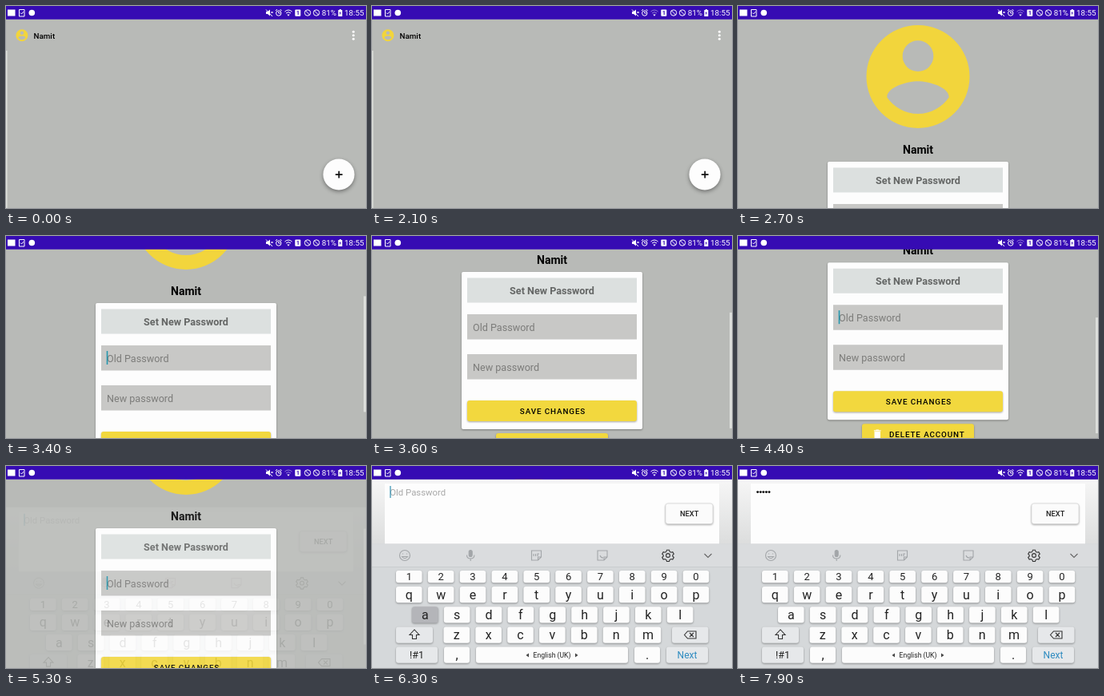
An HTML page that plays this animation: 450 px wide and 253 px high, repeating every 8 s.

```html
<!DOCTYPE html>
<html lang="en">
<head>
<meta charset="utf-8">
<title>Change password</title>
<style>
  html, body { margin: 0; height: 100%; overflow: hidden; background: #b8bab7; }
  svg { display: block; width: 100vw; height: 100vh; font-family: Roboto, sans-serif; }
  .mid { text-anchor: middle; }
  .medium { font-weight: 500; }
  .bold { font-weight: 700; }
  .line { fill: none; stroke: #fff; stroke-width: 1; }
  .tool { fill: none; stroke: #a3a6a9; stroke-width: 1.1; }
  .hint { font-size: 12.6px; fill: #7c7c7a; }
  .caps { font-size: 9.84px; font-weight: 500; letter-spacing: .09em; }
  .raised { filter: drop-shadow(0 1px 1px rgba(0,0,0,.35)); }
  .fab { filter: drop-shadow(0 2px 2.5px rgba(0,0,0,.4)); }
</style>
</head>
<body>
<svg viewBox="0 0 450 253" preserveAspectRatio="none">
  <defs>
    <path id="account" fill-rule="evenodd" d="M12 2a10 10 0 1 0 0 20a10 10 0 1 0 0-20zM12 5a3 3 0 0 1 0 6a3 3 0 0 1 0-6zm0 14.2c-2.5 0-4.71-1.28-6-3.22.03-1.99 4-3.08 6-3.08s5.97 1.09 6 3.08c-1.29 1.94-3.5 3.22-6 3.22z"/>
    <linearGradient id="margin" x2="0" y2="1">
      <stop stop-color="#f6f6f6"/><stop offset="1" stop-color="#dcdddd"/>
    </linearGradient>
  </defs>

  <g id="home">
    <path fill="#b8bab7" d="M0 0h450v253H0z"/>
    <path fill="#dfe2dd" d="M0 56h1.5v197H0z"/>
    <use href="#account" fill="#f2d53c" transform="translate(10.9 27.8) scale(.75)"/>
    <text class="medium" x="34.5" y="40.5" font-size="9.84">Namit</text>
    <g fill="#fff"><circle cx="434.3" cy="32.3" r="1.5"/><circle cx="434.3" cy="36.8" r="1.5"/><circle cx="434.3" cy="41.2" r="1.5"/></g>
    <circle class="fab" cx="416" cy="211" r="19.6" fill="#fdfdfd"/>
    <path d="M411.8 211.2h8.8M416.2 206.8v8.8" stroke="#111" stroke-width="1.7"/>
  </g>

  <g id="profile">
    <path fill="#b8bab7" d="M0 0h450v290H0z"/>
    <g id="page">
      <use href="#account" fill="#f2d53c" transform="translate(147.6 -183.9) scale(6.45)"/>
      <text class="mid bold" x="225" y="-10" font-size="14">Namit</text>
      <rect class="raised" x="112" width="226" height="197" rx="2" fill="#fdfdfd"/>
      <path fill="#dce0df" d="M119 7.500h212v31H119z"/>
      <text class="mid bold" x="225" y="28" font-size="12.6" fill="#646665">Set New Password</text>
      <path fill="#c8c8c6" d="M119 53h212v31.500H119zM119 103h212v31.500H119z"/>
      <text class="hint" x="126" y="73.700">Old Password</text>
      <text class="hint" x="126" y="123.500">New password</text>
      <path id="fieldCursor" fill="#2497ad" d="M125.700 60h1.600v17h-1.600z"/>
      <g class="raised" fill="#f2d83e">
        <rect x="119" y="161" width="212" height="26" rx="3"/>
        <rect x="155" y="202" width="140" height="25" rx="3"/>
      </g>
      <text class="mid caps" x="226" y="177.500">SAVE CHANGES</text>
      <text class="caps" x="189" y="218.700">DELETE ACCOUNT</text>
      <path fill="#fff" transform="translate(166.800 207.500) scale(.62)" d="M6 19c0 1.100.9 2 2 2h8c1.100 0 2-.9 2-2V7H6zM19 4h-3.500l-1-1h-5l-1 1H5v2h14z"/>
    </g>
    <rect id="thumb" x="447" width="3" height="145" fill="#dcdedb"/>
    <circle id="glow" cx="290" r="1372" fill="#623cf0"/>
  </g>

  <g id="ime">
    <path fill="url(#margin)" d="M0 17h450v81H0z"/>
    <path fill="#fdfdfd" d="M16 22h418v76H16z"/>
    <text id="hint" x="22.300" y="37" font-size="11.350" fill="#a8a8a8">Old Password</text>
    <g id="dots"></g>
    <path id="cursor" fill="#2f8fb0" d="M22.400 25h1.200v15h-1.200z"/>
    <rect class="raised" x="367" y="47" width="59" height="25.500" rx="3" fill="#fbfbfb" stroke="#d2d2d2" stroke-width=".6"/>
    <text class="mid medium" x="396.700" y="63.300" font-size="9.300" fill="#222">NEXT</text>
    <path fill="#d5d8da" d="M0 97.500h450V300H0z"/>
    <path fill="#dadcde" d="M0 97.500h450v28.500H0z"/>
    <path fill="#c6c9cb" d="M0 126h450v.8H0z"/>
    <g class="tool">
      <circle cx="41" cy="112" r="6.500"/><path d="M37.500 113.500q3.500 4.500 7 0zM38.500 109.500v1M43.500 109.500v1"/>
      <rect x="121.200" y="105.500" width="4" height="8" rx="2" fill="#a3a6a9"/><path d="M118.500 111.500q0 4.500 4.700 4.500t4.700-4.500M123.200 116v3"/>
      <path d="M199.500 106h12v8l-4 4h-8zM211.500 114h-4v4M202 110v3M204.500 110v3M207 113v-3h2"/>
      <path d="M282 106h12v8l-4 4h-8zM294 114h-4v4M285 112q1 3 4 3"/>
      <g stroke="#333"><circle cx="370" cy="112" r="2.400"/><path d="M368.500 105.200h3l.6 2 1.700 1 2-.5 1.500 2.500-1.500 1.500v1.300l1.500 1.500-1.500 2.500-2-.5-1.700 1-.6 2h-3l-.6-2-1.700-1-2 .5-1.500-2.500 1.500-1.500v-1.300l-1.500-1.500 1.500-2.500 2 .5 1.700-1z"/></g>
      <path stroke="#666" d="M415.500 110l4.500 4.500 4.500-4.500"/>
    </g>
    <g id="keys"></g>
    <path class="tool" style="stroke:#333" d="M53 205l-6 6.500h3.500v5h5v-5H59zM390.500 211.500l4-4.500h10.500v9h-10.500zM397 209l5 5M402 209l-5 5"/>
    <path fill="#444" d="M196 234.500v5l-3.500-2.500zM254 234.500v5l3.500-2.500z"/>
  </g>

  <g id="status" fill="#fff">
    <path fill="#360bb3" d="M0 0h450v16.700H0z"/>
    <rect x="2" y="4.500" width="9.500" height="8"/>
    <path class="line" d="M16.500 4.500h6.500v8.500h-6.500zM18 8.500l1.500 1.500 2.500-3"/>
    <circle cx="32.300" cy="8.500" r="3.800"/>
    <path d="M325 7h2l3-2.500v8l-3-2.500h-2z"/>
    <path class="line" d="M325 4.500l8 8.500M331.500 7l2 2M333.500 7l-2 2"/>
    <g class="line"><circle cx="340.800" cy="9" r="3.200"/><path d="M340.800 7v2h2M337 6l2-2M344.600 6l-2-2"/></g>
    <path id="wifi" class="line" d="M348.500 7q4.500-4 9 0M350 9q3-2.700 6 0"/>
    <path d="M351.300 10.500h3.400L353 12.800z"/>
    <rect x="361.300" y="4.500" width="7" height="8.300" rx="1"/>
    <text class="mid bold" x="364.800" y="11.400" font-size="7.500" fill="#360bb3">1</text>
    <g class="line"><circle cx="377" cy="8.500" r="3.700"/><path d="M374.400 5.900l5.200 5.200"/><circle cx="388" cy="8.500" r="3.700"/><path d="M385.400 5.900l5.200 5.200"/></g>
    <text x="394.800" y="12.200" font-size="9.800">81%</text>
    <path d="M415.300 5h1.500V4h2v1h1.500v8h-5z"/>
    <path fill="#360bb3" d="M418.300 6.500l-2 2.800h1.300l-.5 2.300 2-3h-1.300z"/>
    <text x="423" y="12.200" font-size="9.800">18:55</text>
  </g>
</svg>

<script>
const LOOP = 8000, STEP = 100, MAX_SCROLL = 173;
const $ = id => document.getElementById(id);
const clamp = v => Math.max(0, Math.min(1, v));
const set = (id, name, value) => $(id).setAttribute(name, value);
const show = (id, on) => set(id, 'visibility', on ? 'visible' : 'hidden');

function add(parent, tag, attrs, text = '') {
  const el = document.createElementNS('http://www.w3.org/2000/svg', tag);
  for (const name in attrs) el.setAttribute(name, attrs[name]);
  el.textContent = text;
  return parent.appendChild(el);
}

// Keyboard
const caps = {};
function key(label, x, y, w, h, { size = 16, fill = '#fcfcfc', ink = '#222' } = {}) {
  const cap = add($('keys'), 'rect', { x, y, width: w, height: h, rx: 3, fill, class: 'raised' });
  caps[label] = { cap, fill };
  add($('keys'), 'text', { x: x + w / 2, y: y + h / 2 + size * .34, 'font-size': size, fill: ink, class: 'mid' }, label);
}
const row = (labels, x, y, h, size) =>
  [...labels].forEach((label, i) => key(label, x + i * 39.85, y, 32.6, h, { size }));
const soft = '#e6e8ea';
row('1234567890', 30, 131, 15.3, 13);
row('qwertyuiop', 30, 151, 20.3);
row('asdfghjkl', 50, 176.3, 20.3);
row('zxcvbnm', 89.5, 201.4, 20.3);
key('', 30, 201.4, 46, 20.3, { fill: soft });
key('', 375, 201.4, 45.5, 20.3, { fill: soft });
key('!#1', 30, 226.500, 52, 20.3, { size: 12.5, fill: soft });
key(',', 90, 226.500, 32, 20.3);
key('English (UK)', 130, 226.500, 190, 20.3, { size: 8.6 });
key('.', 328, 226.500, 32, 20.3);
key('Next', 368, 226.500, 52, 20.3, { size: 12, fill: soft, ink: '#2e8bc0' });

// Key, press time, release time
const presses = [['a', 6300, 6500], ['d', 6700, 6800], ['h', 6800, 6900], ['u', 7200, 7300], ['m', 7300, 7400]];
const PITCH = 3.6;
const dots = presses.map((_, i) => add($('dots'), 'circle', { cx: 24.6 + i * PITCH, cy: 32.6, r: 1.45 }));

const scrollPath = [[3100, 0], [3200, 30], [3400, 111], [3600, 150], [3900, MAX_SCROLL], [4300, MAX_SCROLL], [4800, 117]];
function scrollAt(t) {
  const next = scrollPath.findIndex(p => p[0] > t);
  if (next === 0) return 0;
  if (next < 0) return scrollPath.at(-1)[1];
  const [t0, a] = scrollPath[next - 1], [t1, b] = scrollPath[next];
  return a + (b - a) * (t - t0) / (t1 - t0);
}

function draw(t) {
  set('wifi', 'opacity', (t >= 800 && t < 2800) || (t >= 4100 && t < 6300) ? .45 : 1);

  const enter = clamp((t - 2200) / 500), eased = 1 - (1 - enter) ** 2;
  set('profile', 'opacity', eased);
  set('profile', 'transform', `translate(0 ${18 * (1 - eased)})`);
  const scroll = scrollAt(t);
  set('page', 'transform', `translate(0 ${195 - scroll})`);
  show('fieldCursor', t < 3600 || t >= 4400);
  set('thumb', 'y', 17 + 91 * scroll / MAX_SCROLL);
  set('thumb', 'opacity', t < 3200 ? 0 : 1 - .7 * clamp((t - 4800) / 300));

  const rise = clamp((t - 3700) / 300), fade = clamp((t - 4000) / 400);
  set('glow', 'cy', 212 + 1372 + 42 * (1 - rise) + 20 * fade);
  set('glow', 'opacity', .33 * rise * (1 - fade));

  const open = clamp((t - 5200) / 300);
  set('ime', 'opacity', open < .5 ? open * .3 : open ** .8);
  set('ime', 'transform', `translate(0 ${52 * (1 - open)})`);

  const typed = presses.filter(p => t >= p[1] + STEP).length;
  dots.forEach((dot, i) => dot.setAttribute('visibility', i < typed ? 'visible' : 'hidden'));
  show('hint', !typed);
  show('cursor', t < 5800 || (t >= 6300 && t < 7900));
  set('cursor', 'transform', `translate(${typed * PITCH} 0)`);
  for (const [label, down, up] of presses) {
    const { cap, fill } = caps[label];
    cap.setAttribute('fill', t >= down && t < up ? '#b4b5b9' : fill);
  }
}

function tick() {
  draw(Math.floor(performance.now() % LOOP / STEP) * STEP);
  requestAnimationFrame(tick);
}
tick();
</script>
</body>
</html>
```
